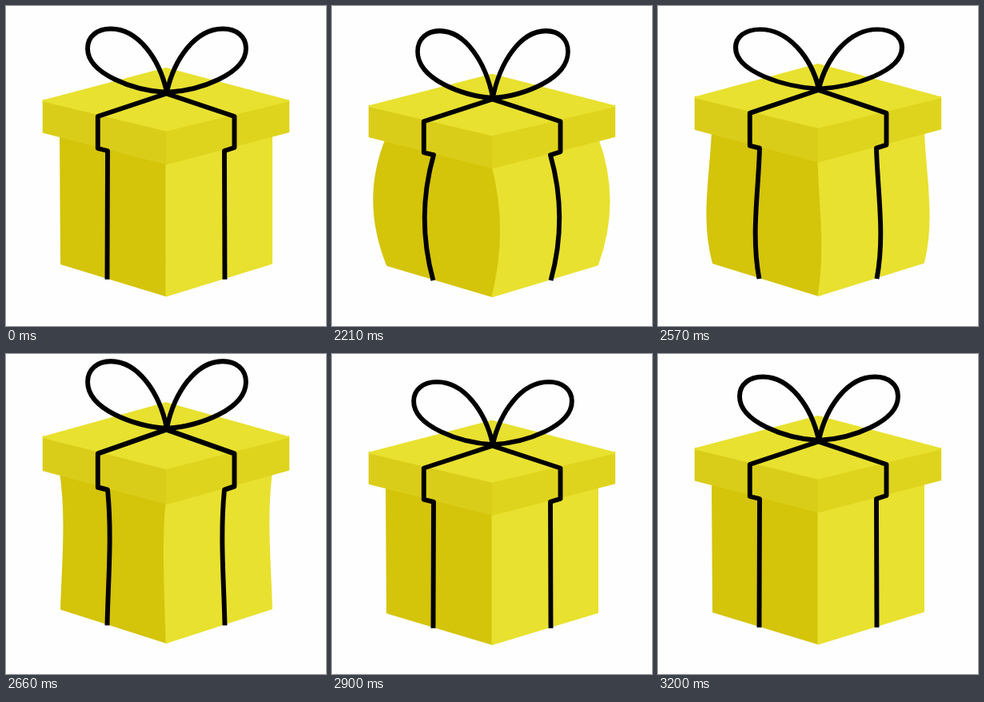
An HTML page for the animation above (3230 ms loop, 400x400 px).

```html
<!DOCTYPE html>
<html lang="en">
<head>
<meta charset="utf-8">
<title>Gift box</title>
<style>
  html, body { margin: 0; width: 100%; height: 100%; overflow: hidden; background: #fefefe; }
  svg { display: block; width: 100vw; height: 100vh; }
  .face { stroke-width: 2; stroke-linejoin: round; }
  .line { fill: none; stroke: #000; stroke-width: 5.9; stroke-linejoin: round; }
  .base-left { fill: #d4c40a; stroke: #d4c40a; }
  .base-right, .top { fill: #e8e12f; stroke: #e8e12f; }
  .lid-left { fill: #dacd19; stroke: #dacd19; }
  .lid-right { fill: #dfd41d; stroke: #dfd41d; }
</style>
</head>
<body>
<svg viewBox="0 0 400 400">
  <g id="box">
    <path id="left" class="face base-left"/>
    <path id="right" class="face base-right"/>
    <path class="face lid-left" d="M46.700 118V157.700L200 197.300V156Z"/>
    <path class="face lid-right" d="M201 156L353.200 118V157.200L201 197.300Z"/>
    <path class="face top" d="M46.700 118.500L200 78L353.200 118.500L200 155.500Z"/>
    <path id="ribbon" class="line"/>
    <g id="bow">
      <path id="loop" class="line" d="M201 108C160 106 102 85 102 53C102 38 114 28.500 131 28.500C165 28.500 192 66 201 108"/>
      <use href="#loop" transform="matrix(-1 0 0 1 402 0)"/>
    </g>
  </g>
</svg>
<script>
const LOOP = 3230, START = 2000;
const $ = id => document.getElementById(id);
const easeOut = u => Math.sin(u * Math.PI / 2);
const easeBoth = u => (1 - Math.cos(u * Math.PI)) / 2;

// Starts abruptly from rest, then swings softly between [time, value] turning points.
const swing = (rest, ...turns) => t => {
  let from = [START, rest], ease = easeOut;
  for (const to of turns) {
    if (t < to[0]) {
      const u = Math.max(0, (t - from[0]) / (to[0] - from[0]));
      return from[1] + (to[1] - from[1]) * ease(u);
    }
    from = to;
    ease = easeBoth;
  }
  return from[1];
};

const height = swing(1, [2440, .964], [2680, 1.055], [2915, .981], [3095, 1.007], [3200, 1]);
const spread = swing(0, [2260, -.053], [2560, .051], [2750, -.043], [2920, 0]);
// The lower half of the belly trails the upper half.
const upper = swing(0, [2350, 27], [2710, -10], [2900, 0]);
const lower = swing(0, [2440, 31], [2740, -8], [2900, 0]);

const zoom = (x, y, sx, sy) => `translate(${x} ${y}) scale(${sx} ${sy}) translate(${-x} ${-y})`;

function draw(t) {
  const hi = upper(t), lo = lower(t), wide = spread(t);

  // Upright edge from x0,y0 to x1,y1; k sets the side and amount of bend.
  const edge = (x0, y0, x1, y1, k) => {
    const third = (y1 - y0) / 3;
    const a = `${x0 + hi * k} ${y0 + third}`, b = `${x1 + lo * k} ${y1 - third}`;
    return { down: `C${a} ${b} ${x1} ${y1}`, up: `C${b} ${a} ${x0} ${y0}` };
  };
  const outerL = edge(68, 160, 69, 322.3, -1);
  const outerR = edge(332, 160, 332, 321.8, .9);
  const front = edge(200.5, 195, 200.5, 362.3, .65);
  const bandL = edge(127, 181, 126.5, 341.8, -.68);
  const bandR = edge(273, 181, 273.5, 341.8, .68);

  $("left").setAttribute("d", `M68 160${outerL.down}L200.5 362.3${front.up}Z`);
  $("right").setAttribute("d", `M200.5 195${front.down}L332 321.8${outerR.up}Z`);
  $("ribbon").setAttribute("d",
    `M126.5 341.8${bandL.up}L114.8 178V138L200.5 109.5L285.5 138V177L273 181${bandR.down}`);
  $("box").setAttribute("transform", zoom(0, 390, 1, height(t)));
  $("bow").setAttribute("transform", zoom(201, 108, 1 + wide, 1 - 1.6 * wide));
}

const start = performance.now();
function tick() {
  draw((performance.now() - start) % LOOP);
  requestAnimationFrame(tick);
}
tick();
</script>
</body>
</html>
```
